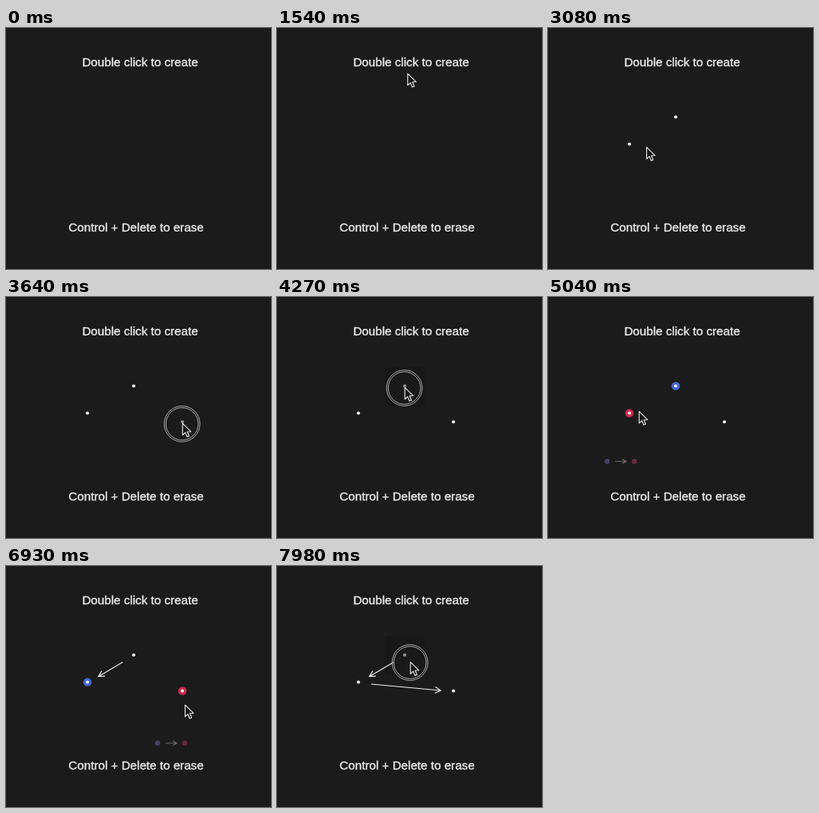
Write an HTML page with a canvas that moves like this. It is 332x302 px and loops after 8000 ms.

```html
<!DOCTYPE html>
<html lang="en">
<head>
<meta charset="utf-8">
<title>Node editor</title>
<style>
html, body { margin: 0; width: 100%; height: 100%; overflow: hidden; background: #1b1b1b; }
canvas { display: block; }
</style>
</head>
<body>
<canvas id="stage" width="332" height="302"></canvas>
<script>
const ctx = document.getElementById('stage').getContext('2d');
const LOOP = 8000, TAU = Math.PI * 2;
const TRAVEL = 300, DELAY = 40, PRESS = 140;
const BG = '#1b1b1b', INK = '#ececec', BLUE = '#4265c9', RED = '#c42a50';

// What the pointer does: arrival time, place, action
const steps = [
  { at: 450, x: 184, y: 164, act: 'click' },
  { at: 1240, x: 164, y: 51, act: 'rest' },
  { at: 1780, x: 160, y: 114, act: 'add' },
  { at: 2540, x: 102, y: 148, act: 'add' },
  { at: 3300, x: 221, y: 159, act: 'add' },
  { at: 4190, x: 160, y: 114, act: 'from' },
  { at: 4650, x: 114, y: 144, act: 'to' },
  { at: 5400, x: 98.5, y: 205.5, act: 'link' },
  { at: 5840, x: 105.5, y: 146, act: 'from' },
  { at: 6530, x: 230, y: 160, act: 'to' },
  { at: 7130, x: 208, y: 216, act: 'link' },
  { at: 7860, x: 167, y: 121, act: 'from' }
];

const nodes = [], links = [], presses = [];
const nearest = p => nodes.reduce((a, b) =>
  Math.hypot(a.x - p.x, a.y - p.y) < Math.hypot(b.x - p.x, b.y - p.y) ? a : b);

for (const s of steps) {
  const start = s.at + DELAY, end = start + PRESS;
  const link = links[links.length - 1];
  const press = { start, end, r: s.act === 'link' ? 31.5 : 22.4 };
  if (s.act !== 'rest') presses.push(press);
  if (s.act === 'add') {
    presses.push({ ...press, start: end + PRESS, end: end + 2 * PRESS });
    nodes.push({ x: s.x, y: s.y - 2.5, born: end + PRESS });
  }
  if (s.act === 'from') {
    press.node = nearest(s);
    links.push({ from: press.node, picked: end });
  }
  if (s.act === 'to') Object.assign(link, { to: nearest(s), dropped: end, menu: { x: s.x - 23, y: s.y + 62 } });
  if (s.act === 'link') link.made = end;
}

const within = (t, a, b = Infinity) => t >= a && t < b;
const smooth = u => u * u * (3 - 2 * u);

function cursorAt(t) {
  let x = 190, y = 306;
  for (const s of steps) {
    const u = (t - s.at) / TRAVEL + 1;
    if (u <= 0) break;
    const k = smooth(Math.min(1, u));
    x += (s.x - x) * k;
    y += (s.y - y) * k;
  }
  return { x, y };
}

function dot({ x, y }, r, color) {
  ctx.fillStyle = color;
  ctx.beginPath();
  ctx.arc(x, y, r, 0, TAU);
  ctx.fill();
}

// Arrow between two points, kept clear of both ends
function arrow(a, b, gap, head, color) {
  const tip = Math.hypot(b.x - a.x, b.y - a.y) - gap;
  ctx.save();
  ctx.translate(a.x, a.y);
  ctx.rotate(Math.atan2(b.y - a.y, b.x - a.x));
  ctx.strokeStyle = color;
  ctx.lineWidth = 1.2;
  ctx.beginPath();
  ctx.moveTo(gap, 0);
  ctx.lineTo(tip, 0);
  ctx.moveTo(tip - head, -head * 0.55);
  ctx.lineTo(tip, 0);
  ctx.lineTo(tip - head, head * 0.55);
  ctx.stroke();
  ctx.restore();
}

function label(text, x, y) {
  ctx.font = '15.2px "Liberation Sans", Arial, sans-serif';
  ctx.textAlign = 'center';
  ctx.fillStyle = ctx.strokeStyle = INK;
  ctx.lineWidth = 0.35;
  ctx.fillText(text, x, y);
  ctx.strokeText(text, x, y);
}

function menu({ x, y }) {
  const left = { x: x - 17, y }, right = { x: x + 17, y };
  ctx.save();
  ctx.globalAlpha = 0.48;
  dot(left, 3.2, '#7468bd');
  arrow(left, right, 10, 5, '#c4c4c4');
  dot(right, 3.2, '#b83b66');
  ctx.restore();
}

function ring({ x, y }, r) {
  dot({ x, y }, r, 'rgba(27,27,27,.45)');
  ctx.strokeStyle = '#cfcfcf';
  ctx.lineWidth = 0.8;
  for (const radius of [r, r - 2.1]) {
    ctx.beginPath();
    ctx.arc(x - 0.4, y, radius, 0, TAU);
    ctx.stroke();
  }
}

const arrowShape = new Path2D('M0 0V14.8L3.4 11.6L5.7 17L8.2 15.9L5.9 10.7L10.6 10.5Z');

function pointer({ x, y }) {
  ctx.save();
  ctx.translate(x + 0.2, y - 0.7);
  ctx.fillStyle = '#161616';
  ctx.strokeStyle = '#ededed';
  ctx.lineWidth = 1.1;
  ctx.lineJoin = 'round';
  ctx.fill(arrowShape);
  ctx.stroke(arrowShape);
  ctx.restore();
}

function draw(t) {
  const cursor = cursorAt(t);
  const press = presses.find(p => within(t, p.start, p.end));
  ctx.fillStyle = BG;
  ctx.fillRect(0, 0, 332, 302);
  label('Double click to create', 168, 48);
  label('Control + Delete to erase', 163, 255);

  if (press && press.node) {
    ctx.fillStyle = '#171717';
    ctx.beginPath();
    ctx.roundRect(press.node.x - 25, press.node.y - 23.5, 50, 49, 4);
    ctx.fill();
  }

  for (const l of links) {
    if (within(t, l.picked, l.made)) dot(l.from, 5.3, BLUE);
    if (within(t, l.dropped, l.made)) {
      dot(l.to, 5.3, RED);
      menu(l.menu);
    }
    if (within(t, l.made)) {
      ctx.save();
      ctx.translate(0, 1);
      arrow(l.from, l.to, 16, 7, INK);
      ctx.restore();
    }
  }
  for (const n of nodes) {
    if (within(t, n.born)) dot(n, 2.1, INK);
  }

  if (press) ring(cursor, press.r);
  pointer(cursor);
}

const origin = performance.now();
function tick() {
  draw((performance.now() - origin) % LOOP);
  requestAnimationFrame(tick);
}
tick();
</script>
</body>
</html>
```
